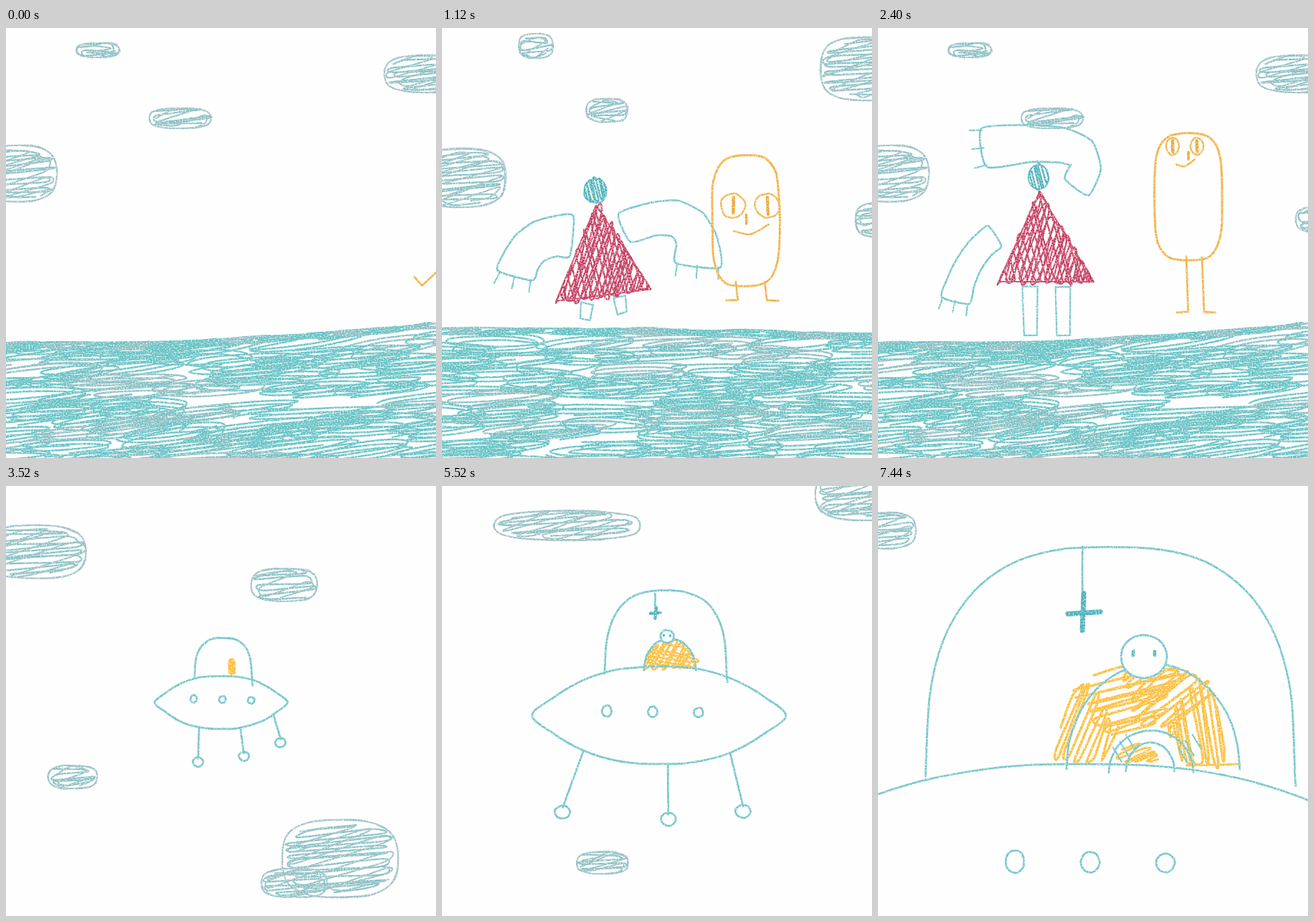
Animation, 600 px wide and 600 px high, one loop 7.52 s. Source, as an HTML page:

```html
<!DOCTYPE html>
<html lang="en">
<head>
<meta charset="utf-8">
<title>Crayon visitors</title>
<style>
html, body { margin: 0; width: 100%; height: 100%; overflow: hidden; background: #fefefe; }
svg { display: block; width: 100%; height: 100%; }
</style>
</head>
<body>
<svg viewBox="0 0 600 600">
  <filter id="crayon" filterUnits="userSpaceOnUse" x="0" y="0" width="600" height="600" color-interpolation-filters="sRGB">
    <feTurbulence type="fractalNoise" baseFrequency=".5" numOctaves="2" seed="4" result="noise"/>
    <feDisplacementMap in="SourceGraphic" in2="noise" scale="2" xChannelSelector="R" yChannelSelector="G" result="rough"/>
    <feColorMatrix in="noise" values="0 0 0 0 0  0 0 0 0 0  0 0 0 0 0  0 0 2.4 0 -.3" result="grain"/>
    <feComposite in="rough" in2="grain" operator="in"/>
  </filter>
  <g id="stage" filter="url(#crayon)" fill="none" stroke-linecap="round" stroke-linejoin="round"></g>
</svg>
<script>
const STEP = 80, FRAMES = 94, TURN = Math.PI * 2;
const TEAL = '#72c4c9', DEEP = '#4cb0ba', SEA = '#66c2c5', MIST = '#8cbfc3', RED = '#c23c5e', GOLD = '#f3b042', SUN = '#fcbe3a';
const stage = document.getElementById('stage');

let seed = 1, shake = 0;
const rand = () => (seed = seed * 16807 % 2147483647) / 2147483647;
const spread = n => (rand() * 2 - 1) * n;
const mix = (a, b, p) => a + (b - a) * p;
const clamp = (v, low = 0, high = 1) => Math.max(low, Math.min(high, v));
const ease = p => p * p * (3 - 2 * p);
const range = (n, make) => Array.from({ length: n }, (_, i) => make(i));
const blend = (a, b, p) => Array.isArray(a) ? a.map((v, i) => mix(v, b[i], p)) : mix(a, b, p);

// Catmull-Rom path; bend 1/6 is fully smooth, 0 is straight.
function trace(list, closed, bend) {
  const n = list.length, f = v => v.toFixed(1);
  const at = i => list[closed ? (i + n) % n : clamp(i, 0, n - 1)];
  let d = `M${list[0].map(f)}`;
  for (let i = 0; i < (closed ? n : n - 1); i++) {
    const [a, b, c, e] = [at(i - 1), at(i), at(i + 1), at(i + 2)];
    const handle = (p, from, to) => [0, 1].map(k => f(p[k] + (to[k] - from[k]) * bend));
    d += `C${handle(b, a, c)} ${handle(c, e, b)} ${c.map(f)}`;
  }
  return d;
}
const wobble = list => list.map(p => p.map(v => v + spread(shake)));
const stroke = (d, color, width) => `<path d="${d}" stroke="${color}" stroke-width="${width}"/>`;
const line = (list, color = TEAL, width = 2.8, bend = 1 / 6) => stroke(trace(wobble(list), false, bend), color, width);
const loop = (list, color = TEAL, width = 2.8, bend = 1 / 6) => stroke(trace(wobble(list), true, bend), color, width);

// Points on a superellipse: n = 2 is an ellipse, higher is boxier.
function round(x, y, rx, ry = rx, n = 2, from = 0, to = TURN, steps = 14) {
  const bulge = v => Math.sign(v) * Math.abs(v) ** (2 / n);
  const last = to - from < TURN ? steps - 1 : steps;
  return range(steps, i => {
    const a = mix(from, to, i / last);
    return [x + rx * bulge(Math.cos(a)), y + ry * bulge(Math.sin(a))];
  });
}
const arch = (x, base, rx, height, n = 2) => round(x, base, rx, height, n, TURN / 2, TURN);

// Continuous zigzag filling an outline, row by row.
function hatch(shape, degrees, gap, color, width, loose = 1.5) {
  const a = degrees * TURN / 360, c = Math.cos(a), s = Math.sin(a);
  const turned = shape.map(([x, y]) => [x * c + y * s, y * c - x * s]);
  const rows = turned.map(p => p[1]), end = Math.max(...rows), zigzag = [];
  let flip = false;
  for (let v = Math.min(...rows) + gap / 2; v < end; v += gap * (.5 + rand())) {
    const cuts = [];
    turned.forEach(([u, w], i) => {
      const [u2, w2] = turned[(i + 1) % turned.length];
      if ((w <= v) !== (w2 <= v)) cuts.push(mix(u, u2, (v - w) / (w2 - w)));
    });
    if (cuts.length < 2) continue;
    const low = Math.min(...cuts), high = Math.max(...cuts);
    const ends = [mix(low, high, rand() * .12), mix(high, low, rand() * .12)];
    if (flip) ends.reverse();
    flip = !flip;
    for (const u of ends) {
      const x = u + spread(loose), y = v + spread(loose);
      zigzag.push([x * c - y * s, x * s + y * c]);
    }
  }
  return zigzag.length > 1 ? stroke(trace(zigzag, false, .12), color, width) : '';
}

function cloud([x, y, rx, ry]) {
  const edge = round(x, y, rx, ry, 2.8), inner = round(x, y, rx * .9, ry * .88, 2.8);
  return loop(edge, MIST, 2) + loop(edge.map(p => p.map(v => v + spread(1.5))), '#a5c0c5', 1.4) +
    hatch(inner, -4, 5.5, '#84c0c5', 2.4, 3) + hatch(inner, -18, 9, '#98bfc4', 2.2, 4);
}

const shores = [
  x => 436 - 28 * Math.max(0, (x - 200) / 400) ** 1.3,
  x => 428 - x / 75,
  x => 416 + Math.max(0, x - 330) / 34
];
// Overlapping flat coils, laid out on a loose grid below the shoreline.
function sea(k) {
  const shore = shores[k], slope = [-.09, -.06, -.03][k];
  const coil = (cx, cy, reach, height, drift) => {
    const tilt = slope + spread(.06), steps = 10 + Math.floor(rand() * 9), phase = rand() * TURN;
    const list = range(steps, i => {
      const a = phase + i * TURN / 6, dx = reach * (.75 + .35 * rand()) * Math.cos(a);
      const y = cy + dx * tilt + height * Math.sin(a) + i * drift;
      return [cx + dx, Math.max(y, shore(cx + dx) + 2 + 4 * rand())];
    });
    return stroke(trace(list, false, 1 / 6), rand() < .72 ? SEA : MIST, 2.5);
  };
  let out = '';
  for (let y = 434; y < 610; y += 18)
    for (let x = 0; x < 650; x += 100)
      out += coil(x + spread(50), y + spread(9), 65 + 45 * rand(), 4 + 6 * rand(), .9);
  for (let x = 0; x < 650; x += 50) out += coil(x, shore(x) + 4, 50, 4, .3);
  return out;
}

const skies = [
  [[128, 31, 30, 10], [243, 126, 43, 14], [15, 203, 56, 39], [590, 64, 62, 26], [610, 267, 27, 17]],
  [[131, 25, 24, 17], [230, 115, 29, 16], [28, 209, 60, 41], [590, 57, 62, 44], [610, 268, 33, 24]]
];

// Wings: shoulder, elbow pull, hand, then width at each end.
const standing = [
  { dressX: 225, dressY: 250, tilt: 5, headR: 16, legW: 15, legH: 17,
    left: [185, 290, 119, 291, 97, 340, 52, 43], right: [256, 279, 365, 235, 354, 330, 40, 48],
    bodyX: 433, top: 176, bottom: 351, eyeX: 0, eyeGap: 25, eyeY: 250, eyeR: [12, 17], legX: 0, legGap: 20, ground: 382 },
  { dressX: 225, dressY: 248, tilt: 9, headR: 16, legW: 16, legH: 22,
    left: [180, 290, 119, 285, 102, 346, 58, 50], right: [255, 279, 365, 235, 357, 331, 42, 62],
    bodyX: 424, top: 178, bottom: 360, eyeX: 6, eyeGap: 24, eyeY: 248, eyeR: [17, 17], legX: 6, legGap: 20, ground: 379 }
];
const stretched = { dressX: 235, dressY: 229, tilt: 0, headR: 14, legW: 21, legH: 68,
  left: [163, 290, 124, 315, 108, 380, 34, 40], right: [277, 222, 333, 142, 148, 167, 40, 54],
  bodyX: 433, top: 147, bottom: 324, eyeX: -5, eyeGap: 17, eyeY: 165, eyeR: [9, 12], legX: 8, legGap: 11, ground: 396 };

function wing([sx, sy, cx, cy, ex, ey, startW, endW]) {
  const spot = (t, side, ahead = 0) => {
    const u = 1 - t, tx = u * (cx - sx) + t * (ex - cx), ty = u * (cy - sy) + t * (ey - cy);
    const size = Math.hypot(tx, ty), half = side * mix(startW, endW, t) / 2;
    return [u * u * sx + 2 * u * t * cx + t * t * ex + (ahead * tx - half * ty) / size,
      u * u * sy + 2 * u * t * cy + t * t * ey + (ahead * ty + half * tx) / size];
  };
  const side = sign => range(6, i => spot(i / 5, sign));
  return loop([...side(1), ...side(-1).reverse()], TEAL, 2.6, .1) +
    [-.9, 0, .9].map(s => line([spot(1, s), spot(1, s * 1.1, 17)], TEAL, 2.2)).join('');
}

function scarlet({ dressX: x, dressY: y, tilt, headR, legW, legH, left, right }) {
  const base = y + 125, dress = [[x - 10, y], [x - 66, base + tilt], [x + 66, base - tilt]];
  const head = round(x - 11, y - 21, headR, 17);
  const leg = side => {
    const cx = x + side * 23, top = base + 7 - side * tilt / 3, lean = side * tilt / 3;
    return loop([[cx - legW / 2, top], [cx + legW / 2, top - lean], [cx + lean + legW / 2 - 1, top + legH - lean], [cx + lean - legW / 2 + 2, top + legH]], TEAL, 2.2, 0);
  };
  return wing(left) + wing(right) + leg(-1) + leg(1) + loop(dress, RED, 2, 0) +
    [104, 75, 112].map(a => hatch(dress, a, 7.5, RED, 2.3, 1)).join('') +
    loop(head, DEEP, 2) + hatch(head, 75, 3.2, DEEP, 2.6, 1);
}

function amber({ bodyX: x, top, bottom, eyeX, eyeGap, eyeY: y, eyeR: [rx, ry], legX, legGap, ground }) {
  const body = round(x, (top + bottom) / 2, 47.5, (bottom - top) / 2, 3.4, 0, TURN, 20);
  const mid = x + eyeX, dark = '#eba632';
  const eye = side => {
    const ex = mid + side * eyeGap;
    return loop(round(ex, y, rx, ry), GOLD, 2.4) + line([[ex, y - ry * .65], [ex, y + ry * .65]], dark, 4.5);
  };
  const leg = side => {
    const lx = x + legX + side * legGap;
    return line([[lx, bottom - 5], [lx + 3, ground], [lx + 3 + side * 16, ground + 1]], GOLD, 2.8, 0);
  };
  return loop(body, GOLD, 3) + eye(-1) + eye(1) + line([[x, y + ry * .7], [x, y + ry * 1.5]], dark, 3.6) +
    line([[mid - rx * 1.3, y + ry * 2.1], [mid, y + ry * 2.3], [mid + rx * 1.5, y + ry * 1.5]], GOLD, 2.6) + leg(-1) + leg(1);
}

function shoreScene(i) {
  const k = i % 3, away = 1 - ease(clamp(i / 6)), up = ease(clamp((i - 22) / 5));
  shake = 0;
  const base = standing[k ? 1 : 0], now = {};
  for (const key in base) now[key] = blend(base[key], stretched[key], up);
  const backdrop = sea(k) + skies[k ? 1 : 0].slice(0, i ? 5 : 4).map(cloud).join('');
  shake = k ? 1 : .4;
  return backdrop +
    `<g transform="translate(${-420 * away} ${-39 * away}) rotate(${-25 * away} 215 387)">${scarlet(now)}</g>` +
    `<g transform="translate(${170 * away} ${-36 * away}) rotate(${52 * away} 400 383)">${amber(now)}</g>`;
}

// Lens hull, glass dome and three portholes; each leg is [top dx, foot dx, foot dy].
function saucer({ x, y, rx, ry, dome, holes: [holeX, holeY, gap, size], legs = [] }) {
  const bulge = t => ry * (1 - Math.abs(t) ** 2.5);
  const rim = sign => range(12, i => {
    const t = i / 6 - 1;
    return [x + sign * rx * t, y - sign * bulge(t)];
  });
  const [domeX, base, domeR, height] = dome;
  return loop([...rim(1), ...rim(-1)]) +
    line([...arch(domeX, base, domeR, height, 2.7), [domeX + domeR + 1, base + 12]]) +
    range(3, i => loop(round(holeX + i * gap, holeY + i, size, size * (1.2 - i * .1)))).join('') +
    legs.map(([from, to, drop]) => line([[x + from, y + bulge(from / rx)], [x + to, y + drop - size]]) +
      loop(round(x + to, y + drop, size * 1.6, size * 1.4))).join('');
}

// Rider with a lamp hanging from the glass, drawn around the rider's base.
function pilot(x, base, s, lampX, lampTop) {
  const headX = x - 13 * s, headY = base - 157 * s, lampY = lampTop + 92 * s, thick = 3 + 4 * s;
  return line(arch(x, base, 121 * s, 147 * s)) + `<g fill="#fefefe">${loop(round(headX, headY, 32 * s, 30 * s))}</g>` +
    [-1, 1].map(side => line([[headX + 15 * s * side, headY - 7 * s], [headX + 15 * s * side, headY - 2 * s]], DEEP, 2 + 2.5 * s)).join('') +
    line([[lampX, lampTop], [lampX, lampY]]) + line([[lampX + 2, lampY - 27 * s], [lampX, lampY + 25 * s]], DEEP, thick) +
    line([[lampX - 20 * s, lampY + s], [lampX + 25 * s, lampY - s]], DEEP, thick);
}

const farScene = () =>
  [[40, 92, 72, 37], [388, 138, 46, 23], [93, 406, 34, 16], [466, 520, 81, 54], [402, 554, 46, 20]].map(cloud).join('') +
  saucer({ x: 300, y: 302, rx: 93, ry: 37, dome: [303, 267, 40, 55], holes: [262, 297, 40, 4.5],
    legs: [[-31, -32, 83], [27, 32, 75], [73, 83, 56]] }) +
  hatch(round(315, 252, 5, 11), 88, 2.2, SUN, 3.2, .5);

const nearScene = () =>
  [[175, 55, 102, 20], [224, 526, 36, 15], [590, 12, 69, 36]].map(cloud).join('') +
  hatch(arch(319, 254, 36, 38), -58, 5, SUN, 3.2) + hatch(arch(319, 254, 36, 34), 8, 7, SUN, 2.8) +
  saucer({ x: 303, y: 320, rx: 177, ry: 68, dome: [312, 262, 85, 116], holes: [230, 314, 64, 6.5],
    legs: [[-106, -135, 135], [12, 13, 145], [99, 117, 134]] }) +
  pilot(318, 257, .3, 297, 150);

function closeScene() {
  const outer = arch(369, 388, 119, 136, 2.8), inner = arch(367, 388, 58, 60);
  const part = (from, to) => [...outer.slice(from, to), ...inner.slice(from, to).reverse()];
  const patches = [[part(0, 5), -70], [part(3, 9), -14], [part(6, 11), -40], [part(9, 14), 80]];
  return cloud([10, 62, 43, 25]) +
    patches.map(([shape, angle]) => hatch(shape, angle, 7, SUN, 3.5, 4)).join('') +
    hatch(arch(362, 384, 28, 24), -25, 4.5, SUN, 3) + line([[430, 390], [505, 388]], SUN) +
    saucer({ x: 290, y: 538, rx: 480, ry: 150, dome: [324, 405, 258, 320], holes: [191, 524, 105, 13] }) +
    pilot(384, 395, 1, 285, 85) + line(arch(381, 400, 59, 59)) + line(arch(380, 398, 34, 40)) +
    range(6, i => {
      const x = i < 3 ? 334 + i * 9 : 395 + i * 10;
      return line([[x - 6, 365 - i % 3 * 9], [x + 6, 385 - i % 3 * 9]], TEAL, 2.2);
    }).join('');
}

// calm: which of the three redraws has no wobble.
const scenes = [
  { start: 0, draw: shoreScene },
  { start: 40, draw: farScene, calm: 1 },
  { start: 58, draw: nearScene, calm: 2 },
  { start: 76, draw: closeScene, calm: 2 }
];
const cache = [];
function drawing(frame) {
  if (cache[frame]) return cache[frame];
  const scene = scenes.filter(s => s.start <= frame).pop(), i = frame - scene.start, k = i % 3;
  seed = 7919 * (k + 1) + scene.start;
  shake = k === scene.calm ? .4 : 1.4;
  return cache[frame] = scene.draw(i);
}

let shown = -1;
const begin = performance.now();
function tick() {
  const frame = Math.floor((performance.now() - begin) / STEP) % FRAMES;
  if (frame !== shown) stage.innerHTML = drawing(shown = frame);
  requestAnimationFrame(tick);
}
tick();
</script>
</body>
</html>
```
